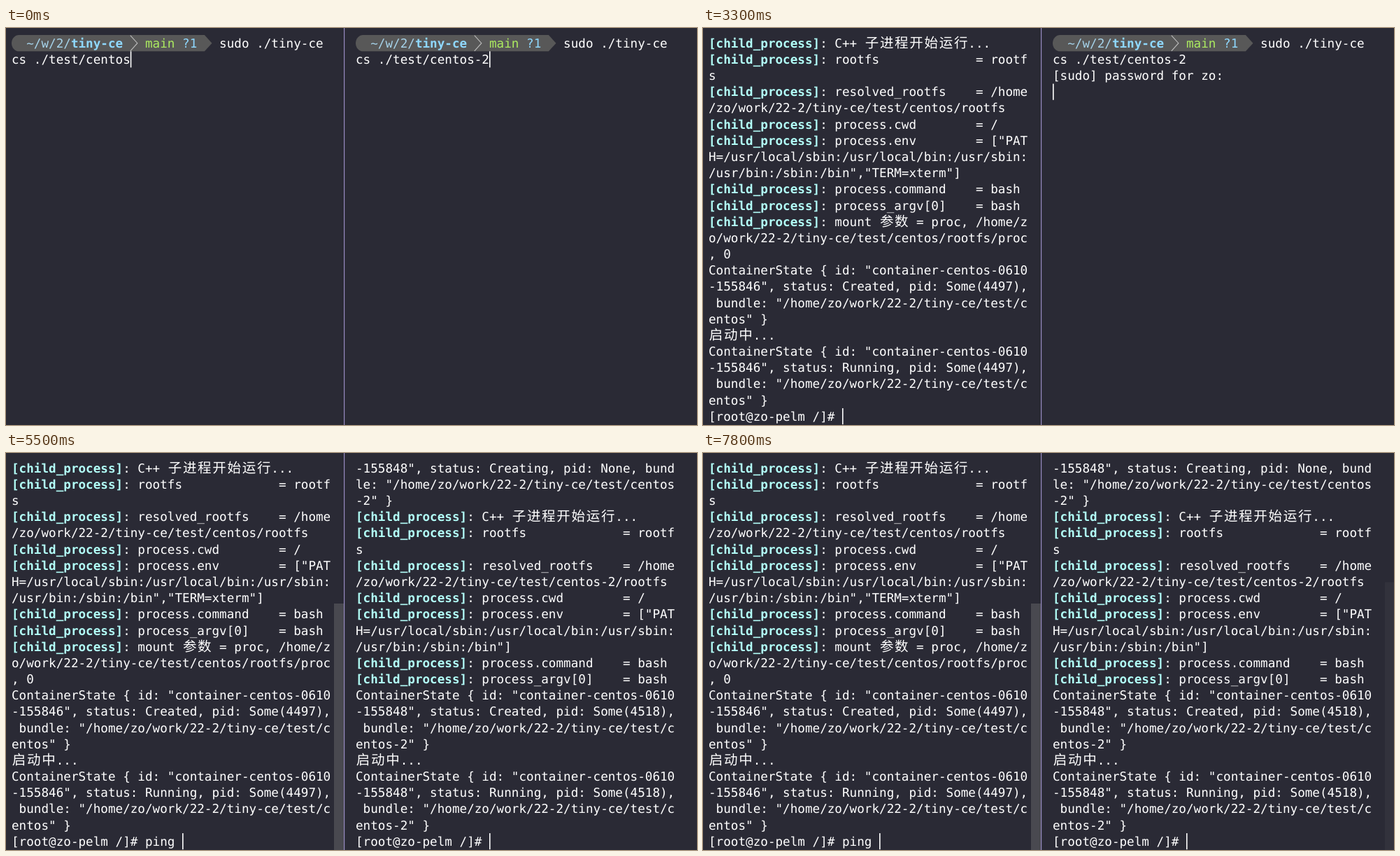
An HTML page with a canvas for the animation above (8000 ms loop, 988 px wide and 567 px high).

```html
<!DOCTYPE html>
<html lang="en">
<head>
<meta charset="utf-8">
<title>Two terminals</title>
<style>
html, body { margin: 0; width: 100%; height: 100%; overflow: hidden; background: #2a2a35; }
canvas { display: block; width: 988px; height: 567px; }
</style>
</head>
<body>
<canvas id="stage" width="988" height="567"></canvas>
<script>
const ctx = document.getElementById('stage').getContext('2d');
const W = 988, H = 567, LOOP = 8000;
const COLS = 43, ROWS = 24, CELL = 10.61, LINE = 23.17, TOP = 10.1, BASE = 17.7;
const LEFT = 8, RIGHT = 500;
const FONT = '17.6px "DejaVu Sans Mono", monospace';
const WIDE = 19.5;
const WIDE_FONT = WIDE + 'px "Noto Sans CJK SC", "Noto Sans CJK", sans-serif';
const BG = '#2a2a35', FG = '#ffffff', TAG = '#b2fff8', PILL = '#585858';
const PATH = '#a6d3ea', DIR = '#8fd8ff', BRANCH = '#aceb60';
const HOME = '/home/zo/work/22-2/tiny-ce/test/';
const SHELL = '[root@zo-pelm /]# ';
const PASSWORD = '[sudo] password for zo: ';
const MARK = '[child_process]';

const span = ch => ch > '\u2e80' ? 2 : 1;

function wrap(text) {
  const rows = [''];
  let used = 0;
  for (const ch of text) {
    if (used + span(ch) > COLS) {
      rows.push('');
      used = 0;
    }
    rows[rows.length - 1] += ch;
    used += span(ch);
  }
  return rows;
}

function buildLog({ name, id, pid, term, mount }) {
  const child = text => MARK + ': ' + text;
  const field = (key, value) => child(key.padEnd(19) + '= ' + value);
  const state = (status, proc) =>
    `ContainerState { id: "container-centos-0610-${id}", status: ${status}, pid: ${proc}, bundle: "${HOME}${name}" }`;
  const some = `Some(${pid})`;
  const root = HOME + name + '/rootfs';
  const lines = [
    state('Creating', 'None'),
    child('C++ 子进程开始运行...'),
    field('rootfs', 'rootfs'),
    field('resolved_rootfs', root),
    field('process.cwd', '/'),
    field('process.env', `["PATH=/usr/local/sbin:/usr/local/bin:/usr/sbin:/usr/bin:/sbin:/bin"${term}]`),
    field('process.command', 'bash'),
    field('process_argv[0]', 'bash'),
    ...(mount ? [child(`mount 参数 = proc, ${root}/proc, 0`)] : []),
    state('Created', some),
    '启动中...',
    state('Running', some),
    SHELL
  ];
  return lines.flatMap(wrap).slice(-ROWS);
}

const leftLog = buildLog({ name: 'centos', id: '155846', pid: 4497, term: ',"TERM=xterm"', mount: true });
const rightLog = buildLog({ name: 'centos-2', id: '155848', pid: 4518, term: '', mount: false });

function put(x, row, col, text, color = FG, bold = false) {
  const y = TOP + row * LINE + BASE;
  ctx.fillStyle = color;
  for (const ch of text) {
    const wide = span(ch) === 2;
    ctx.font = wide ? WIDE_FONT : (bold ? 'bold ' : '') + FONT;
    const inset = wide ? CELL - WIDE / 2 : 0;
    if (ch !== ' ') ctx.fillText(ch, x + col * CELL + inset, y);
    col += span(ch);
  }
}

function caret(x, row, col) {
  ctx.fillStyle = FG;
  ctx.fillRect(x + col * CELL, TOP + row * LINE, 1.6, LINE);
}

function drawPrompt(x, dir) {
  const at = col => x + col * CELL;
  const mid = TOP + LINE / 2, end = TOP + LINE;
  ctx.fillStyle = PILL;
  ctx.beginPath();
  ctx.moveTo(at(26), TOP);
  ctx.lineTo(at(27), mid);
  ctx.lineTo(at(26), end);
  ctx.lineTo(at(1), end);
  ctx.ellipse(at(1), mid, CELL, LINE / 2, 0, Math.PI / 2, Math.PI * 1.5);
  ctx.fill();
  ctx.strokeStyle = '#bcbcbc';
  ctx.lineWidth = 1.1;
  ctx.beginPath();
  ctx.moveTo(at(16), TOP + 0.5);
  ctx.lineTo(at(16.95), mid);
  ctx.lineTo(at(16), end - 0.5);
  ctx.stroke();
  put(x, 0, 2, '~/w/2/', PATH);
  put(x, 0, 8, 'tiny-ce', DIR, true);
  put(x, 0, 18, 'main', BRANCH);
  put(x, 0, 23, '?1', DIR);
  put(x, 0, 28, 'sudo ./tiny-ce');
  put(x, 1, 0, 'cs ./test/' + dir);
}

function drawLog(x, log) {
  log.forEach((text, row) => {
    const tagged = text.startsWith(MARK);
    if (tagged) put(x, row, 0, MARK, TAG, true);
    const skip = tagged ? MARK.length : 0;
    put(x, row, skip, text.slice(skip));
  });
}

function scrollbar(x, y, width, alpha) {
  ctx.fillStyle = `rgba(121,121,121,${0.4 * alpha})`;
  ctx.fillRect(x, y, width, H - y);
}

// Value of the last [time, value] step already reached.
const stepAt = (t, steps) => steps.reduce((v, [at, next]) => t >= at ? next : v, steps[0][1]);

function drawLeft(t) {
  if (t < 1700) {
    drawPrompt(LEFT, 'centos');
    if (t < 800) return caret(LEFT, 1, 16);
    put(LEFT, 2, 0, PASSWORD);
    if (t < 1400) caret(LEFT, 2, PASSWORD.length);
    return;
  }
  const typed = stepAt(t, [[0, ''], [5100, 'p'], [5300, 'pi'], [5400, 'ping'], [5500, 'ping ']]);
  drawLog(LEFT, leftLog);
  put(LEFT, ROWS - 1, SHELL.length, typed);
  if (t < 2200 || t >= 2300) caret(LEFT, ROWS - 1, SHELL.length + typed.length);
  scrollbar(469, 215, 14, stepAt(t, [[0, 1], [2700, 0.4], [2800, 0], [4300, 1]]));
}

function drawRight(t) {
  if (t < 3400) {
    drawPrompt(RIGHT, 'centos-2');
    if (t < 2700) return caret(RIGHT, 1, 18);
    put(RIGHT, 2, 0, PASSWORD);
    if (t < 3300) caret(RIGHT, 2, PASSWORD.length);
    else caret(RIGHT, 3, 0);
    return;
  }
  drawLog(RIGHT, rightLog);
  if (t < 3900 || t >= 4500) caret(RIGHT, ROWS - 1, SHELL.length);
  scrollbar(975, 184.5, 13, stepAt(t, [[0, 1], [4900, 0], [7400, 1], [7800, 0.25]]));
}

function drawPopup(alpha) {
  if (!alpha) return;
  ctx.save();
  ctx.globalAlpha = alpha;
  ctx.shadowColor = 'rgba(0,0,0,0.45)';
  ctx.shadowBlur = 60;
  ctx.shadowOffsetY = 24;
  ctx.fillStyle = '#f5f5f5';
  ctx.beginPath();
  ctx.roundRect(168, -60, 436, 70.4, 5);
  ctx.fill();
  ctx.restore();
}

function draw(t) {
  ctx.fillStyle = BG;
  ctx.fillRect(0, 0, W, H);
  drawLeft(t);
  drawRight(t);
  ctx.fillStyle = '#988cc2';
  ctx.fillRect(483, 0, 1.2, H);
  drawPopup(stepAt(t, [[0, 0], [6000, 0.3], [6100, 0.75], [6200, 1], [7300, 0.4], [7400, 0]]));
}

ctx.textBaseline = 'alphabetic';
ctx.textRendering = 'geometricPrecision';
const start = performance.now();
function tick() {
  draw((performance.now() - start) % LOOP);
  requestAnimationFrame(tick);
}
tick();
</script>
</body>
</html>
```
